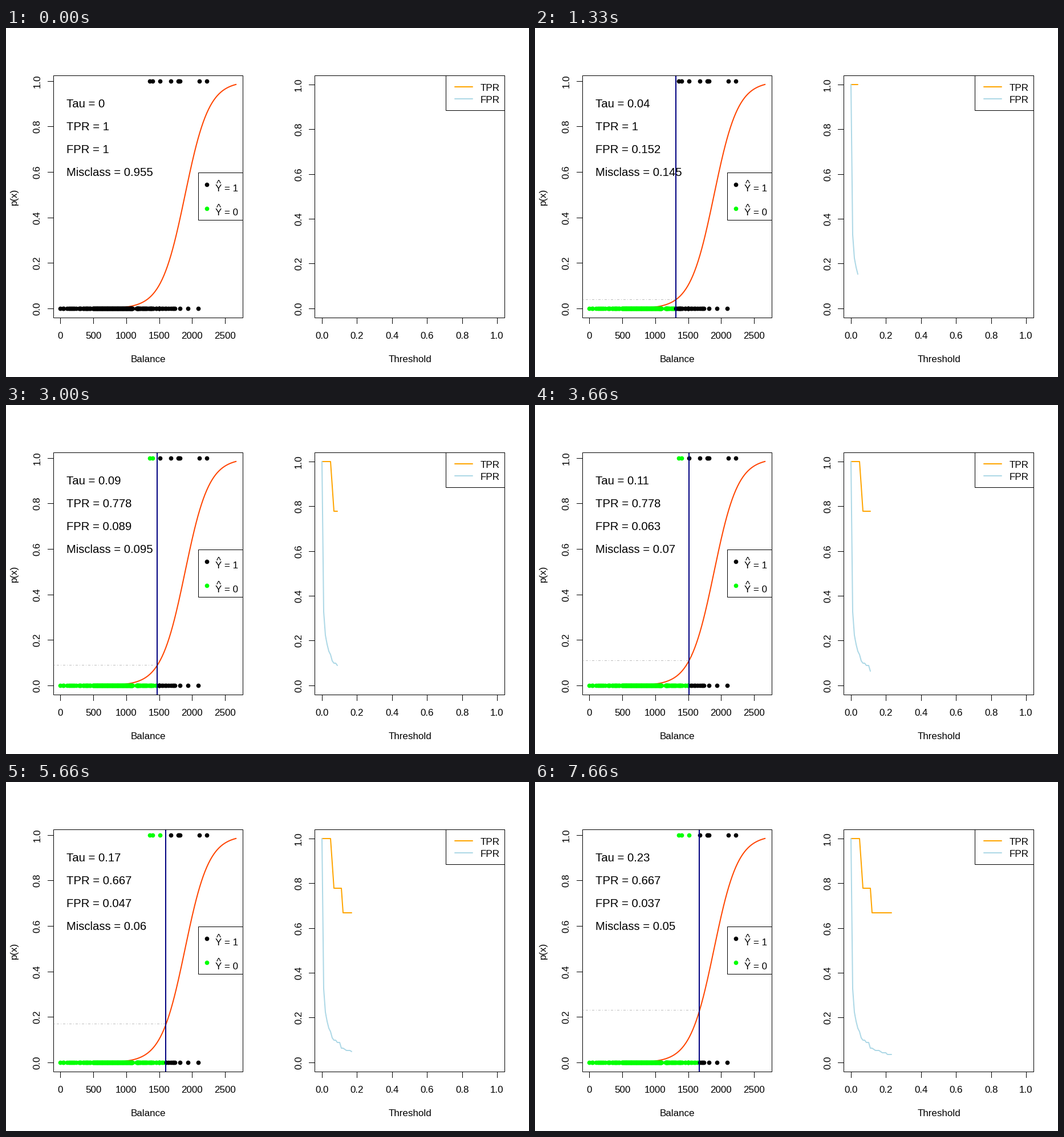
Recreate the animation shown at these times as a matplotlib script. Size 917x611 px, loop 7990 ms.

```python
import numpy as np
import matplotlib.pyplot as plt
from matplotlib.animation import FuncAnimation
from matplotlib.patches import Rectangle

W, H, DPI = 917, 611, 64
PT = 72 / DPI               # points per pixel
LINE = 20.38                # height of one margin line
FONT = LINE / 1.2
STEPS, LOOP_MS, TICK_MS = 24, 7990, 34

plt.rcParams.update({"font.family": "Liberation Sans", "path.snap": False})
fig = plt.figure(figsize=(W / DPI, H / DPI), dpi=DPI, facecolor="white")
ax = fig.add_axes([0, 0, 1, 1])
ax.set(xlim=(0, W), ylim=(H, 0))
ax.axis("off")


class Panel:
    """Plot region in pixels with a 4 % margin around the data."""

    def __init__(self, left, right, x_max, y_max):
        self.left, self.right, self.top, self.bottom = left, right, 83.55, 507.06
        pad_x, pad_y = (right - left) / 27, (self.bottom - self.top) / 27
        self.x0, self.y0 = left + pad_x, self.bottom - pad_y
        self.sx, self.sy = 25 * pad_x / x_max, 25 * pad_y / y_max

    def x(self, value):
        return self.x0 + np.asarray(value) * self.sx

    def y(self, value):
        return self.y0 - np.asarray(value) * self.sy

    def axes(self, x_ticks, x_label, y_label=""):
        frame(self.left, self.top, self.right, self.bottom)
        middle_x, middle_y = (self.left + self.right) / 2, (self.top + self.bottom) / 2
        for value in x_ticks:
            px = self.x(value)
            hairline(px, self.bottom, px, self.bottom + 10)
            label(np.floor(px), 543.7, f"{value}", ha="center")
        for value in np.arange(6) / 5:
            py = self.y(value)
            hairline(self.left - 10, py, self.left, py)
            label(self.left - 24, np.floor(py), f"{value:.1f}", **upright)
        label(middle_x, 585, x_label, ha="center")
        label(self.left - 64.5, middle_y, y_label, **upright)


upright = dict(ha="center", rotation=90, rotation_mode="anchor")


def label(x, y, text, size=FONT, **kw):
    return ax.text(x, y, text, fontsize=size * PT, va="baseline", zorder=6, **kw)


def pixel(value):
    return np.floor(value) + 0.5


def hairline(x1, y1, x2, y2):
    ax.plot(pixel([x1, x2]), pixel([y1, y2]), color="black", lw=PT, zorder=5,
            solid_capstyle="projecting")


def frame(x1, y1, x2, y2):
    x1, y1, x2, y2 = pixel([x1, y1, x2, y2])
    ax.add_patch(Rectangle((x1, y1), x2 - x1, y2 - y1, fc="none", ec="black",
                           lw=PT, joinstyle="miter", zorder=5))


def stroke(x, y, color, **kw):
    return ax.plot(x, y, color=color, lw=2 * PT, solid_capstyle="round",
                   solid_joinstyle="round", **kw)[0]


def dots(x, y, color):
    return ax.plot(x, y, "o", color=color, ms=7.7 * PT, mew=0, zorder=3)[0]


# Logistic model and sample
SLOPE, MID, X_MAX = 0.0055, 1889, 2664


def prob(x):
    return 1 / (1 + np.exp(-SLOPE * (x - MID)))


def cutoff(tau):
    return MID + np.log(tau / (1 - tau)) / SLOPE if tau > 0 else -np.inf


positives = np.array([1360, 1397, 1512, 1676, 1787, 1800, 1815, 2108, 2220])
negatives = np.concatenate([
    [0, 36, 48, 102, 128, 142, 158, 182, 198, 212, 236],
    np.linspace(280, 312, 4), np.linspace(345, 455, 12),
    np.linspace(492, 1048, 101),
    np.linspace(1056, 1094, 13), np.linspace(1156, 1180, 7),
    np.linspace(1186, 1250, 8), np.linspace(1262, 1306, 6),
    [1316, 1330, 1345, 1358, 1365, 1373, 1380, 1386, 1398, 1412, 1450, 1461],
    [1492, 1495, 1500, 1503, 1507, 1538, 1552, 1594, 1610, 1642],
    [1676, 1700, 1722, 1740, 1815, 1938, 2090],
])
sample_x = np.concatenate([negatives, positives])
sample_y = np.concatenate([np.zeros(len(negatives)), np.ones(len(positives))])

taus = np.arange(STEPS) / 100
cutoffs = np.array([cutoff(t) for t in taus])
tpr = np.array([(positives > c).mean() for c in cutoffs])
fpr = np.array([(negatives > c).mean() for c in cutoffs])
misclass = np.array([((sample_x > c) != sample_y).mean() for c in cutoffs])

# Static parts
left = Panel(83.55, 415.7, X_MAX, 0.985)
right = Panel(541.98, 874.2, 1, 1)
left.axes(range(0, 2501, 500), "Balance", "p(x)")
right.axes(np.arange(6) / 5, "Threshold")

grid = np.linspace(0, X_MAX, 300)
stroke(left.x(grid), left.y(prob(grid)), "orangered", zorder=1)

frame(337, 253, 415, 336)
for row, color, value in ((0, "black", 1), (42, "lime", 0)):
    dots([352], [274 + row], color)
    label(367, 285.5 + row, f"Y = {value}")
    label(373, 277.5 + row, "^", ha="center")

frame(771, 83, 874, 144)
for y, color, name in ((103, "orange", "TPR"), (124, "lightblue", "FPR")):
    stroke([787, 818], [y, y], color)
    label(832, y + 7, name)

# Moving parts
green = dots([], [], "lime")
black = dots([], [], "black")
level, = ax.plot([], [], color="#bebebe", lw=PT, ls=(0, (1, 3, 4, 3)),
                 dash_capstyle="butt", zorder=2)
marker = ax.plot([], [], color="navy", lw=2 * PT, solid_capstyle="butt", zorder=4)[0]
tpr_line = stroke([], [], "orange", zorder=1)
fpr_line = stroke([], [], "lightblue", zorder=2)
readouts = [label(105.5, left.y(p) + 6.3, "", size=1.19 * FONT)
            for p in (0.9, 0.8, 0.7, 0.6)]


def update(tick):
    # The step in force at the end of this tick
    k = int(((tick + 1) * TICK_MS - 1) * STEPS / LOOP_MS)
    above = sample_x > cutoffs[k]
    for artist, mask in ((green, ~above), (black, above)):
        artist.set_data(np.floor(left.x(sample_x[mask])),
                        np.floor(left.y(sample_y[mask])))

    if k:
        px, py = np.floor(left.x(cutoffs[k])), pixel(left.y(taus[k]))
        marker.set_data([px, px], [83, 508])
        level.set_data([85, px], [py, py])
    else:
        marker.set_data([], [])
        level.set_data([], [])

    shown = slice(0, k + 1 if k else 0)
    for line, rate in ((tpr_line, tpr), (fpr_line, fpr)):
        line.set_data(np.floor(right.x(taus[shown])), np.floor(right.y(rate[shown])))

    names = ("Tau", "TPR", "FPR", "Misclass")
    for text, name, series in zip(readouts, names, (taus, tpr, fpr, misclass)):
        text.set_text(f"{name} = {round(series[k], 3):g}")


anim = FuncAnimation(fig, update, frames=LOOP_MS // TICK_MS, interval=TICK_MS,
                     init_func=lambda: update(0), repeat=True)
plt.show()
```
